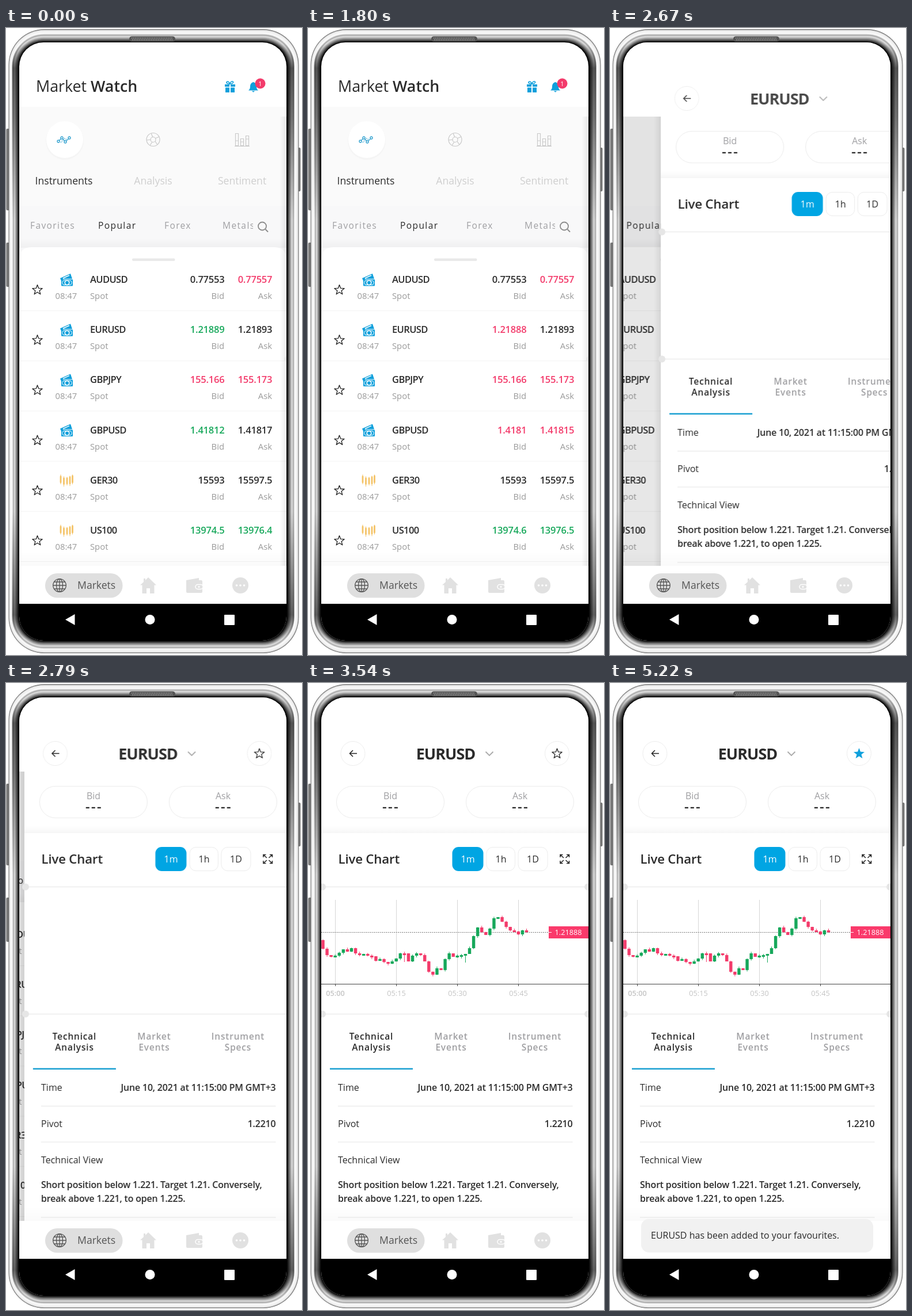
An HTML page for the animation above (5.37 s loop, 514 px wide and 1090 px high).

```html
<!DOCTYPE html>
<html lang="en">
<head>
<meta charset="utf-8">
<title>Market Watch</title>
<style>
html, body { margin: 0; width: 100%; height: 100%; overflow: hidden; background: #fff; }
svg { display: block; width: 514px; height: 1090px; }
:root { --blue: #0fa0dc; --red: #f33b6b; --green: #17a85b; --ink: #2b2b2b; }
text { font-family: "Open Sans", "Noto Sans", sans-serif; fill: var(--ink); white-space: pre; }
.mid { text-anchor: middle; }
.end { text-anchor: end; }
.title { font-size: 26.8px; }
.pair { font-size: 16.5px; font-weight: 600; letter-spacing: -.6px; }
.price { font-size: 16.5px; font-weight: 600; letter-spacing: -.2px; }
.note { font-size: 14.8px; fill: #9a9a9a; }
.section { font-size: 17.6px; }
.filter { font-size: 15.5px; letter-spacing: 1.4px; }
.tab { font-size: 15.5px; font-weight: 600; letter-spacing: .8px; }
.row { font-size: 16px; }
.strong { font-weight: 600; letter-spacing: -.2px; }
.axis { font-size: 12.7px; fill: #c4c4c4; }
.off { fill: #9f9fa2; }
.pale { fill: #cfcfcf; }
.red { fill: var(--red); }
.green { fill: var(--green); }
.blue { fill: var(--blue); }
.line { fill: none; stroke: #e5e5e5; }
.ring { fill: #fff; stroke: #ececec; }
.icon { fill: none; stroke: #222; stroke-width: 1.5; }
.under, .over, .header, .dim, .disc, .bar, .toast { animation: 5370ms linear infinite; }
.under { animation-name: under; }
.over { animation-name: over; }
.header { animation-name: header; }
.dim { animation-name: dim; }
.disc { animation-name: disc; }
.bar { animation-name: bar; }
.toast { animation-name: toast; }
@keyframes disc {
  0%, 75.978% { opacity: 0; }
  78.2%, 79.4% { opacity: .95; }
  85.475%, 100% { opacity: 0; }
}
@keyframes bar {
  0%, 75.978% { opacity: 1; }
  78.2%, 100% { opacity: 0; }
}
</style>
</head>
<body>
<svg viewBox="0 0 514 1090">
  <defs>
    <clipPath id="screen"><rect x="23" y="25" width="464" height="1040" rx="42"/></clipPath>
    <clipPath id="metals"><rect x="370" y="330" width="59" height="30"/></clipPath>
    <linearGradient id="fade" x2="0" y2="1">
      <stop stop-opacity="0"/><stop offset="1" stop-opacity=".035"/>
    </linearGradient>
    <linearGradient id="edge">
      <stop stop-opacity="0"/><stop offset="1" stop-opacity=".08"/>
    </linearGradient>
    <linearGradient id="gloss" x2="0" y2="1">
      <stop offset=".01" stop-opacity="0"/><stop offset=".05" stop-opacity=".6"/>
      <stop offset=".13" stop-opacity=".45"/><stop offset=".3" stop-opacity="0"/>
      <stop offset=".78" stop-opacity="0"/><stop offset=".95" stop-opacity=".55"/>
      <stop offset=".99" stop-opacity="0"/>
    </linearGradient>
    <g id="cash">
      <path class="blue" d="M-11-3 7-11 10-2H-6V4H-8z"/>
      <path d="M-6-3 5-8" stroke="#fff" stroke-width="1.5"/>
      <rect class="blue" x="-9" y="-1" width="20" height="11.5" rx="1"/>
      <rect x="-7" y="1" width="16" height="7.5" rx="3" fill="none" stroke="#fff"/>
      <circle class="blue" cx="1" cy="4.8" r="3.8" stroke="#fff" stroke-width="1.6"/>
    </g>
    <g id="sticks" stroke="#f4c367" stroke-linecap="round">
      <path d="M-10-7V3M-4.500-4V6M1-4V5M6-6V5M10.500-8V3" stroke-width="2.800"/>
      <path d="M-10-10V6M-4.500-7V10M1-6V8M6-8V9M10.500-10V6" stroke-width="1"/>
    </g>
  </defs>

  <g id="body"></g>
  <rect x="214" y="14.500" width="80" height="9" rx="4.500" fill="#555"/>
  <path d="M218 17.500H290M219 20.500H289" stroke="#aaa" stroke-width="1.5" stroke-dasharray="1.5 1.5"/>

  <g clip-path="url(#screen)">
    <rect x="23" y="25" width="464" height="1040" fill="#fff"/>

    <g class="under">
      <rect x="23" y="137" width="464" height="173" fill="#fafafa"/>
      <rect x="23" y="309" width="464" height="110" fill="#f8f8f9"/>
      <rect x="23" y="365" width="464" height="17" fill="url(#fade)"/>
      <circle cx="102" cy="196" r="33" fill="#f5f5f5"/>
      <circle cx="102" cy="194" r="32" fill="#fff"/>
      <g fill="#fff" stroke="#2d9fce" stroke-width="1.3">
        <path d="M91 197 97 191 103 198 110 191" fill="none"/>
        <path d="M95 199 101 192 106 194" fill="none" stroke-dasharray="1.5 1.5"/>
        <circle cx="91" cy="197" r="2"/><circle cx="97" cy="191" r="2"/>
        <circle cx="103" cy="198" r="2"/><circle cx="110" cy="191" r="2"/>
      </g>
      <g fill="none" stroke="#c9c9c9" stroke-width="1.2">
        <circle cx="255.500" cy="194" r="11.500"/><circle cx="255.500" cy="194" r="4.500"/>
        <path d="M255 190 252 183M259 192 266 189M259 197 263 203M254 198 250 204M251 194 244 195"/>
        <path d="M398.500 183.500h5v21h-5zM407.500 192.500h5v12h-5zM416.500 187.500h5v17h-5zM397 205.500h26M399 196h4M408 198h4M417 193h4"/>
      </g>
      <text class="section mid" x="100.500" y="272">Instruments</text>
      <text class="section mid pale" x="255.500" y="272">Analysis</text>
      <text class="section mid pale" x="410" y="272">Sentiment</text>
      <text class="filter off" x="42" y="349">Favorites</text>
      <text class="filter" x="160" y="349" style="font-weight:500">Popular</text>
      <text class="filter off" x="275" y="349">Forex</text>
      <g clip-path="url(#metals)"><text class="filter off" x="376" y="349">Metals</text></g>
      <path d="M450.500 350 455 354.500" stroke="#8c8c8c" stroke-width="2"/>
      <circle cx="445" cy="344.500" r="7" fill="none" stroke="#8c8c8c" stroke-width="1.8"/>
      <path d="M23 1001V403Q23 381 45 381H465Q487 381 487 403V1001z" fill="#fff"/>
      <rect x="219" y="400.500" width="74.500" height="4.500" rx="2" fill="#e9e9e9"/>
      <g id="quotes"></g>
    </g>
    <rect class="dim" x="23" y="154" width="464" height="781"/>

    <g id="listHeader">
      <text class="title" x="52" y="111">Market <tspan font-weight="600">Watch</tspan></text>
      <g class="blue">
        <path d="M380 98h8v4h-8zM390 98h8v4h-8zM381 103.500h7v8.500h-7zM390 103.500h7v8.500h-7z"/>
        <path d="M388.500 97q-7 0-5-3.500 3-2 5 3.500 3-6 6-3.500 1 3.500-6 3.500" fill="none" stroke="#0fa0dc" stroke-width="1.6"/>
        <path d="M421 108.500q3-2 3-7 0-6 5.500-7.500 5.500 1.500 5.500 7.500 0 5 3 7zM427 109.500h5q-2.500 4-5 0z"/>
      </g>
      <circle cx="441.500" cy="96.500" r="9" class="red"/>
      <text class="mid" x="441.500" y="100.500" style="font-size:11px;fill:#fff">1</text>
    </g>

    <g class="over">
      <rect x="11" y="154" width="12" height="850" fill="url(#edge)"/>
      <rect x="23" y="154" width="464" height="850" fill="#fff"/>
      <rect class="ring" x="49.500" y="179.500" width="187" height="55" rx="27.500"/>
      <rect class="ring" x="274.500" y="179.500" width="187" height="55" rx="27.500"/>
      <g id="spreads"></g>
      <rect x="23" y="248" width="464" height="13" fill="url(#fade)"/>
      <text x="52.500" y="314" style="font-size:22.300px;font-weight:600;letter-spacing:-.2px">Live Chart</text>
      <rect x="250.500" y="285" width="54" height="42" rx="11" fill="#00a5e3"/>
      <rect class="ring" x="310" y="285.500" width="49.500" height="41" rx="11"/>
      <rect class="ring" x="365" y="285.500" width="51" height="41" rx="11"/>
      <text class="row mid" x="277.500" y="311.500" style="fill:#fff">1m</text>
      <text class="row mid" x="335" y="311.500">1h</text>
      <text class="row mid" x="390.500" y="311.500">1D</text>
      <path class="icon" d="M438 303V298.500H442.500M438.500 299 444 304M449 298.500H453.500V303M453 299 447.500 304M438 309V313.500H442.500M438.500 313 444 308M449 313.500H453.500V309M453 313 447.500 308"/>
      <path class="line" d="M23 354.500H487M23 575.500H487"/>
      <g fill="#e6e6e6">
        <circle cx="25" cy="354.500" r="6"/><circle cx="486" cy="354.500" r="6"/>
        <circle cx="25" cy="575.500" r="6"/><circle cx="486" cy="575.500" r="6"/>
      </g>
      <g id="chart"></g>
      <g id="tabs"></g>
      <rect x="38" y="669.500" width="144" height="2.500" fill="#1ba0d2"/>
      <path class="line" d="M52 735.500H459.500M52 798H459.500"/>
      <text class="row" x="52" y="709">Time</text>
      <text class="row strong end" x="459.500" y="709">June 10, 2021 at 11:15:00 PM GMT+3</text>
      <text class="row" x="52" y="772">Pivot</text>
      <text class="row strong end" x="459.500" y="772">1.2210</text>
      <text class="row" x="52" y="835">Technical View</text>
      <text class="row strong" x="52" y="878">Short position below 1.221. Target 1.21. Conversely,</text>
      <text class="row strong" x="52" y="902">break above 1.221, to open 1.225.</text>
      <path class="line" d="M52 929H459.500"/>
    </g>

    <g id="pairHeader">
      <rect x="23" y="25" width="464" height="129" fill="#fff"/>
      <g class="header">
        <circle class="ring" cx="78" cy="122.500" r="21"/>
        <path class="icon" d="M85 122.500H72.500M78 117 72.500 122.500 78 128"/>
        <text class="mid" x="239" y="132.500" style="font-size:27px;font-weight:700;letter-spacing:-1px">EURUSD</text>
        <path d="M308.500 119.500 315 126 321.500 119.500" fill="none" stroke="#aaa" stroke-width="1.8"/>
        <g id="favourite">
          <circle class="ring" cx="432.500" cy="122.500" r="21"/>
          <g id="favouriteStar"></g>
          <circle class="disc" cx="432.500" cy="122.500" r="22" fill="#1397cf"/>
        </g>
      </g>
    </g>

    <rect x="23" y="910" width="464" height="25" fill="url(#fade)" opacity=".6"/>
    <rect x="23" y="935" width="464" height="70" fill="#fff"/>
    <g class="bar">
      <rect x="68" y="948" width="134.500" height="42.500" rx="21" fill="#dfdfdf"/>
      <g fill="none" stroke="#555" stroke-width="1.3">
        <circle cx="93" cy="969" r="11.300"/><ellipse cx="93" cy="969" rx="5.500" ry="11.300"/>
        <path d="M93 958V980M82 969H104M84 963H102M84 975H102"/>
      </g>
      <text class="section" x="124" y="975" style="fill:#555">Markets</text>
      <g fill="#e1e1e1">
        <path d="M247 955 261 968.500H257.500V983H250V974H244V983H236.500V968.500H233L239 963V957H242V960z"/>
        <path d="M313 960 335 956V960H339Q341 960 341 963V980Q341 982 339 982H315Q313 982 313 980z"/>
        <circle cx="407" cy="969" r="14"/>
      </g>
      <rect x="329" y="967.500" width="13" height="8" rx="4" fill="#e1e1e1" stroke="#fff" stroke-width="1.5"/>
      <g fill="#fff">
        <circle cx="335" cy="971.500" r="1.500"/>
        <circle cx="400.500" cy="969" r="1.800"/><circle cx="407" cy="969" r="1.800"/><circle cx="413.500" cy="969" r="1.800"/>
      </g>
    </g>
    <g class="toast">
      <rect x="54" y="931.500" width="403" height="58.500" rx="14" fill="#f1f1f1"/>
      <text class="row" x="71" y="966">EURUSD has been added to your favourites.</text>
    </g>
    <rect x="23" y="1001" width="464" height="70"/>
    <path d="M103 1028.500 119.500 1019V1038z" fill="#fff"/>
    <circle cx="250" cy="1028.500" r="8.500" fill="#fff"/>
    <rect x="379" y="1020" width="18" height="18" rx="1" fill="#fff"/>
  </g>
</svg>
<script>
const LOOP = 5370;
const $ = id => document.getElementById(id);
const sheet = document.styleSheets[0];
const add = (id, markup) => $(id).insertAdjacentHTML('beforeend', markup);
const text = (x, y, cls, str, style = '') =>
  `<text x="${x}" y="${y}" class="${cls}" style="${style}">${str}</text>`;
const rect = (x, y, w, h, attrs) =>
  `<rect x="${x}" y="${y}" width="${w}" height="${h}" ${attrs}/>`;
const key = (t, css) => `${t / LOOP * 100}% { ${css} } `;
const addKeyframes = (name, keys) =>
  sheet.insertRule(`@keyframes ${name} { ${keys} }`, sheet.cssRules.length);

// Exponential glide; css receives the share of the way still to go.
function settle(name, start, css) {
  const decay = 60, length = 480;
  let keys = key(0, css(1));
  for (let t = 0; t < length; t += 15) keys += key(start + t, css(Math.exp(-t / decay)));
  addKeyframes(name, keys + key(start + length, css(0)) + key(LOOP, css(0)));
}
const pushAt = 2553, toastAt = 4110;
settle('under', pushAt, left => `transform: translateX(${-153 * (1 - left)}px)`);
settle('over', pushAt, left => `transform: translateX(${464 * left}px)`);
settle('header', pushAt, left => `transform: translateX(${394 * left}px); opacity: ${1 - left}`);
settle('dim', pushAt, left => `opacity: ${.11 * (1 - left)}`);
settle('toast', toastAt, left => `transform: translateY(${72 * left}px)`);

// Style that shows an element only between two times of the loop.
const spans = new Set();
function during(from, to = LOOP) {
  const name = `during-${from}-${to}`;
  if (!spans.has(name)) {
    spans.add(name);
    const on = 'opacity: 1', off = 'opacity: 0';
    addKeyframes(name, (from ? key(0, off) : '') + key(from, on)
      + (to < LOOP ? key(to, off) + key(LOOP, off) : key(LOOP, on)));
  }
  return `animation: ${name} ${LOOP}ms step-end infinite`;
}

function star(cx, cy, r, attrs) {
  const points = Array.from({ length: 10 }, (_, i) => {
    const a = i * Math.PI / 5, d = i % 2 ? r * .42 : r;
    return `${(cx + d * Math.sin(a)).toFixed(2)},${(cy - d * Math.cos(a)).toFixed(2)}`;
  });
  return `<polygon points="${points.join(' ')}" ${attrs}/>`;
}
const outline = 'fill="none" stroke="#222" stroke-width="1.3" stroke-linejoin="round"';

function drawBody() {
  const shades = [[0, 100], [1.5, 235], [6, 252], [8, 165], [10, 225], [14, 120], [17, 25], [18, 0]];
  const shade = d => {
    const k = Math.max(1, shades.findIndex(s => s[0] >= d));
    const [[d0, g0], [d1, g1]] = [shades[k - 1], shades[k]];
    return Math.round(g0 + (g1 - g0) * (d - d0) / (d1 - d0));
  };
  let out = rect(.5, 175, 6, 142, 'rx="2" fill="#777"') + rect(.5, 373, 6, 77, 'rx="2" fill="#777"')
    + rect(505, 208, 6.5, 76, 'rx="2" fill="#777"');
  for (let d = 0; d <= 18; d += .5) {
    const g = shade(d), x = 4.5 + d, y = 2 + d * 1.25;
    out += rect(x, y, 508.5 - d * 1.15 - x, 1087 - d * 1.2 - y, `rx="${62 - d * 1.1}" fill="rgb(${g},${g},${g})"`);
  }
  out += rect(17, 17, 477, 1056, 'rx="49" fill="none" stroke="url(#gloss)" stroke-width="13"');
  add('body', out);
}

// Each price is a list of [start, value, colour].
const quotes = [
  ['AUDUSD', [[0, '0.77553', '']], [[0, '0.77557', 'red']]],
  ['EURUSD', [[0, '1.21889', 'green'], [630, '1.21888', 'red']], [[0, '1.21893', '']]],
  ['GBPJPY', [[0, '155.166', 'red']], [[0, '155.173', 'red']]],
  ['GBPUSD', [[0, '1.41812', 'green'], [840, '1.4181', 'red']],
    [[0, '1.41817', ''], [840, '1.41815', 'red'], [2250, '1.41816', 'green']]],
  ['GER30', [[0, '15593', '']], [[0, '15597.5', '']]],
  ['US100', [[0, '13974.5', 'green'], [1800, '13974.6', 'green']],
    [[0, '13976.4', 'green'], [1800, '13976.5', 'green']]],
];
function drawQuotes() {
  const prices = (x, y, list) => list.map(([from, value, colour], i) =>
    text(x, y, `price end ${colour}`, value, list.length > 1 ? during(from, list[i + 1]?.[0]) : '')).join('');
  quotes.forEach(([name, bid, ask], i) => {
    const y = 443 + i * 87.2;
    add('quotes', star(54.5, y + 12.5, 9, outline)
      + `<use href="#${i < 4 ? 'cash' : 'sticks'}" x="105" y="${y - 5}"/>`
      + text(146, y, 'pair', name) + prices(379.5, y, bid) + prices(462.3, y, ask)
      + text(85.5, y + 28, 'note', '08:47') + text(146, y + 28, 'note', 'Spot')
      + text(379, y + 28, 'note end', 'Bid') + text(462, y + 28, 'note end', 'Ask')
      + `<path d="M23 ${y + 48.5}H487" stroke="#f3f3f3"/>`);
  });
}

const closes = [462, 473, 475, 474, 469, 463, 467, 461, 470, 473, 471, 474, 475, 483, 480, 485, 488,
  484, 479, 470, 470, 484, 474, 470, 473, 484, 502, 507, 496, 499, 480, 470, 476, 474, 473, 471,
  461, 440, 425, 433, 438, 427, 409, 407, 415, 424, 430, 432, 437, 430, 433];
function drawChart() {
  let out = '';
  ['05:00', '05:15', '05:30', '05:45'].forEach((label, i) => {
    const x = 47.5 + i * 106;
    out += `<path d="M${x} 377V523" stroke="#d6d6d6"/><path d="M${x} 523V527" stroke="#444"/>`
      + text(x, 544, 'axis mid', label, i ? '' : 'font-weight:600');
  });
  out += '<path d="M23 523.5H487" stroke="#444"/>'
    + '<path d="M23 433.5H418" stroke="#777" stroke-dasharray="2 1.5"/>';
  let open = 447;
  closes.forEach((close, i) => {
    const x = 26 + i * 7.07, top = Math.min(open, close), h = Math.max(3, Math.abs(close - open));
    const up = 1.5 + 1.5 * Math.sin(i * 2.3), down = i === 20 || i === 35 ? 12 : 1.5 + 1.5 * Math.sin(i * 1.7);
    const cls = `class="${close < open ? 'green' : 'red'}"`;
    out += rect(x - .5, top - up, 1, h + up + down, cls) + rect(x - 2.7, top, 5.4, h, cls);
    open = close;
  });
  out += rect(418, 423, 69, 21, 'fill="#fa3a6b"') + '<path d="M418 433.5h5" stroke="#fff"/>'
    + text(428.5, 438, 'axis', '1.21888', 'fill:#fff');
  add('chart', out);
  $('chart').style = during(2850);
}

function drawPair() {
  [['Bid', 143], ['Ask', 368]].forEach(([label, x]) => add('spreads',
    text(x, 202, 'row mid off', label)
    + text(x + 1, 223, 'mid', '---', 'font-size:24px;font-weight:600;letter-spacing:2.3px')));
  [['Technical', 'Analysis', 110], ['Market', 'Events', 248.5], ['Instrument', 'Specs', 394]]
    .forEach(([a, b, x], i) => {
      const cls = `tab mid ${i ? 'off' : ''}`;
      add('tabs', text(x, 620, cls, a) + text(x, 639, cls, b));
    });
  add('favouriteStar', star(432.5, 123, 9, `${outline} style="${during(0, 4140)}"`)
    + star(432.5, 123, 10, `class="blue" style="${during(4140)}"`));
  $('listHeader').style = during(0, 2520);
  $('pairHeader').style = during(2520);
  $('favourite').style = during(2730);
}

drawBody();
drawQuotes();
drawChart();
drawPair();
</script>
</body>
</html>
```
